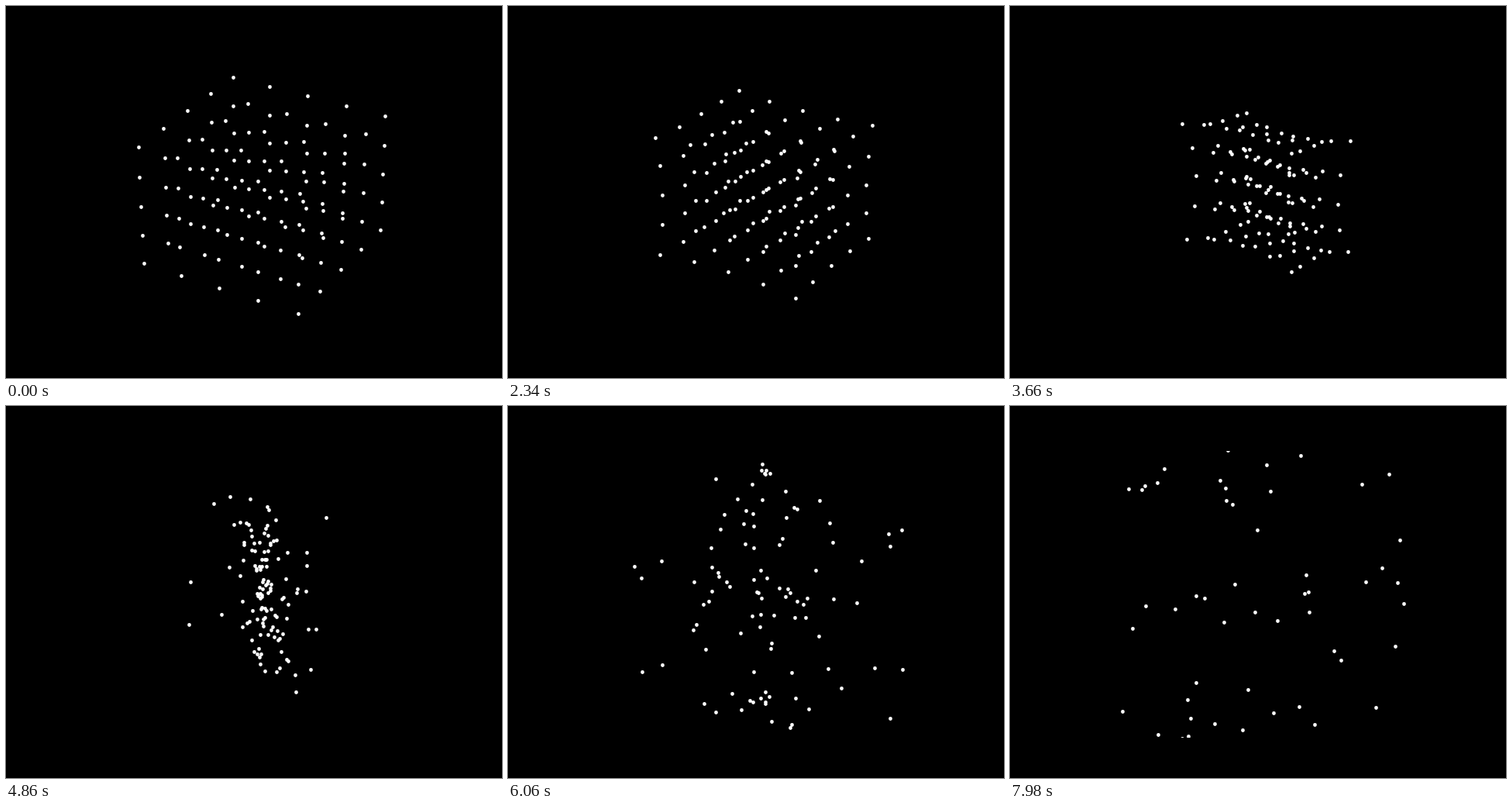
Write an HTML page that moves like this. It is 640 px wide and 480 px high and loops after 8000 ms.

```html
<!DOCTYPE html>
<html lang="en">
<head>
<meta charset="utf-8">
<title>Particle lattice</title>
<style>
  html, body { margin: 0; width: 100%; height: 100%; overflow: hidden; background: #000; }
  svg { display: block; width: 640px; height: 480px; }
  path { fill: none; stroke: #fff; stroke-width: 4.8; stroke-linecap: round; }
</style>
</head>
<body>
<svg viewBox="0 0 640 480">
  <clipPath id="axes"><rect x="143" y="58" width="371" height="370"/></clipPath>
  <g clip-path="url(#axes)"><path id="dots"/></g>
</svg>
<script>
const LOOP = 8000, STEP = 60, DELAY = 1;
const FRAMES = Math.ceil(LOOP / STEP);
const SPACING = 0.5;
const GRAVITY = 6.674e-6 / SPACING ** 3; // per step, in lattice spacings

// 5 x 5 x 5 lattice at rest, unit spacing
const bodies = [];
for (let y = 2; y >= -2; y--)
  for (let x = -2; x <= 2; x++)
    for (let z = -2; z <= 2; z++)
      bodies.push({ x, y, z, vx: 0, vy: 0 });

// Inverse-square attraction; z is driven by the y component
function advance() {
  for (const p of bodies) {
    let ax = 0, ay = 0;
    for (const q of bodies) {
      const dx = q.x - p.x, dy = q.y - p.y, dz = q.z - p.z;
      const r2 = dx * dx + dy * dy + dz * dz;
      if (r2 === 0) continue;
      const pull = GRAVITY / (r2 * Math.sqrt(r2));
      ax += dx * pull;
      ay += dy * pull;
    }
    p.vx += ax;
    p.vy += ay;
    p.x += p.vx;
    p.y += p.vy;
    p.z += p.vy;
  }
}

// Perspective camera: azimuth -60, elevation 30, distance 10, box 4:4:3
const AZ = -Math.PI / 3, EL = Math.PI / 6;
const CA = Math.cos(AZ), SA = Math.sin(AZ), CE = Math.cos(EL), SE = Math.sin(EL);
const UNIT = 0.28572, FOCAL = 1997.8, CX = 333, CY = 237.4;

function project({ x, y, z }) {
  const X = x * UNIT, Y = y * UNIT, Z = z * UNIT * 0.75;
  const out = X * CA + Y * SA;
  const depth = 10 - out * CE - Z * SE;
  if (depth < 0.1) return null;
  const k = FOCAL / depth;
  return [CX + k * (Y * CA - X * SA), CY - k * (Z * CE - out * SE)];
}

function outline() {
  let d = "";
  for (const p of bodies) {
    const at = project(p);
    if (!at) continue;
    const [px, py] = at.map(v => Math.round(v) + 0.5);
    if (px > 139 && px < 518 && py > 54 && py < 432) d += `M${px} ${py}h0`;
  }
  return d;
}

const shapes = [];
for (let n = 0; n < FRAMES; n++) {
  if (n > DELAY) advance();
  shapes.push(outline());
}

const dots = document.getElementById("dots");
let shown = -1;
function draw(now) {
  const n = Math.floor((now % LOOP) / STEP);
  if (n !== shown) dots.setAttribute("d", shapes[shown = n]);
}

let start;
function tick(now) {
  start ??= now;
  draw(now - start);
  requestAnimationFrame(tick);
}
draw(0);
requestAnimationFrame(tick);
</script>
</body>
</html>
```
